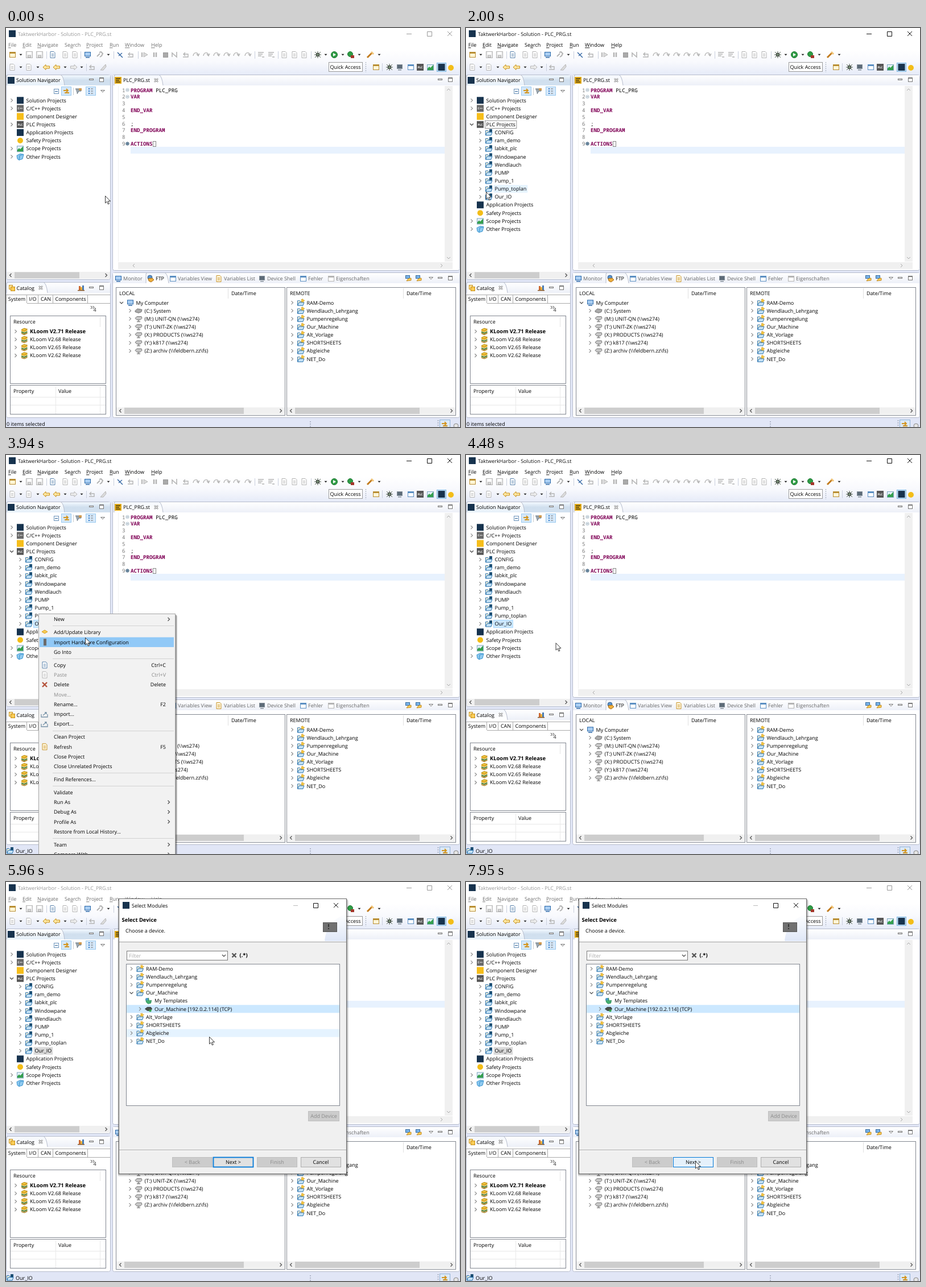
An HTML page for the animation above (8000 ms loop, 798 by 702 pixels).

```html
<!DOCTYPE html>
<html lang="en">
<head>
<meta charset="utf-8">
<title>Import hardware configuration</title>
<style>
html, body { margin: 0; width: 100%; height: 100%; overflow: hidden; background: #e1e6f6; }
svg { display: block; font: 9px "Open Sans", "Noto Sans", sans-serif; text-rendering: geometricPrecision; }
text { white-space: pre; }
.b { font-weight: 700; font-size: 9.4px; }
.code { font: 9.2px "Noto Sans Mono", "DejaVu Sans Mono", monospace; }
.kw { font-weight: 700; fill: #7f0055; }
.u { text-decoration: underline; }
.off { fill: #8a8a8a; }
.tiny { font-size: 5px; font-weight: 700; fill: #fff; text-anchor: middle; }
.mid { text-anchor: middle; }
.end { text-anchor: end; }
</style>
</head>
<body>
<svg id="stage" width="798" height="702" viewBox="0 0 798 702"></svg>
<script>
const PITCH = 14.15, LOOP = 8000;
const esc = s => s.replace(/&/g, '&amp;').replace(/</g, '&lt;');
const rect = (x, y, w, h, fill, more = '') => `<rect x="${x}" y="${y}" width="${w}" height="${h}" fill="${fill}" ${more}/>`;
const box = (x, y, w, h, fill, line) => rect(x + .5, y + .5, w - 1, h - 1, fill, `stroke="${line}"`);
const path = (d, line, fill = 'none', w = 1) => `<path d="${d}" stroke="${line}" fill="${fill}" stroke-width="${w}"/>`;
const disc = (x, y, r, fill, line = 'none') => `<circle cx="${x}" cy="${y}" r="${r}" fill="${fill}" stroke="${line}"/>`;
const text = (x, y, s, cls = '', fill = '') => `<text x="${x}" y="${y + 3.2}" class="${cls}" ${fill && `fill="${fill}"`}>${esc(s)}</text>`;
const at = (x, y, body) => `<g transform="translate(${x} ${y})">${body}</g>`;
const group = (id, body, more = '') => `<g id="${id}" ${more}>${body}</g>`;
const fade = (id, ...colors) => `<linearGradient id="${id}" x2="0" y2="1">${colors.map((c, i) =>
  `<stop offset="${i / (colors.length - 1)}" stop-color="${c}"/>`).join('')}</linearGradient>`;
const tag = (s, fill) => rect(-6, -6, 12, 12, fill) + `<text y="2" class="tiny">${s}</text>`;
const sheet = (line, fill = '#fff') => path('M-4-5.5H2L4-3.5V5.5H-4Z', line, fill) + path('M-2-1.5H2M-2 .5H2M-2 2.5H2', line, 'none', .8);
const pane = (line, fill = '#fff') => box(-5, -5, 11, 10, fill, line) + rect(-5, -5, 11, 3, line);
const left = (fill, line) => path('M-6 0L-1-4.5V-2H5.5V2H-1V4.5Z', line, fill);
const GRAY = '#b4b4b4';

const icons = {
  navy: rect(-6, -6, 12, 12, '#17334e'),
  gold: rect(-6, -6, 12, 12, '#f6bd1a'),
  sun: disc(0, 0, 5, '#f3bd18'),
  plc: tag('PLC', '#555'),
  cpp: tag('C++', '#686868'),
  folder: path('M-5.5 5V-3.5H-1.5L-.5-2H4V0', '#2b73ae', '#fdf6dc') + path('M-5.5 5L-3-.5H6L4 5Z', '#2b73ae', '#c4e2f6'),
  star: path('M3.5-7L4.5-4.7 7-4 4.800-2.500 4.500 0 3-1.700 .5-1.500 1.700-3.700 1-6 3-5.300Z', '#c88f17', '#f8c93b', .6),
  badge: rect(1, -6, 5, 5, '#1d4f73'),
  scope: box(-6, -5, 12, 11, '#e4f1fa', '#7fa6bd') + path('M-5 5V2L-2-1 0 1 5-4V5Z', 'none', '#35a04d'),
  cubes: path('M-6-2L0-5 6-4 4 4-2 6-5 4Z', '#3a93cf', '#8fcaf0') + path('M-2 6L-1-2 6-4', '#3a93cf'),
  monitor: box(-5, -5, 11, 8, '#a8cdf2', '#2a67a8') + rect(-3, 4, 7, 1.5, '#2a67a8'),
  drive: path('M-6-1L-3-4H5L6-1 3 2H-3Z', '#777', '#c8c8c8') + path('M0 2V5M-3 5H3', '#777', 'none', 1.3),
  disk: path('M-6 0L-2-3.5 6-2 5 2 0 4-6 2Z', '#777', '#aaa'),
  books: path('M-5-3L0-5.5 5.500-4 0-1Z', '#b98a1b', '#f3c73c') + path('M-5-2L0 0 5.500-2.500', '#e2ab27', 'none', 2) +
    path('M-5 1L0 3 5.500 .5', '#4f7d2c', 'none', 2) + path('M-5 3.500L0 5.500 5.500 3', '#a87a1c', 'none', 1.600),
  shelf: rect(-4, -3, 3, 7, '#cf6b32') + rect(-1, -1, 3, 5, '#e9b23a') + rect(2, -4, 3, 8, '#4a7db5') + rect(-6, 4, 12, 1.500, '#8a5a2a'),
  crate: box(-5, -5, 7, 8, '#ffe7a0', '#c88f17') + box(-2, -2, 8, 8, '#f8cb55', '#c88f17'),
  ftp: disc(-1, -2, 4, '#5a93cd', '#39628e') + path('M-4 0L3-1 6 2 1 6-3 4Z', '#a96a12', '#f0b03c'),
  pane: pane('#5b8fc2'), gpane: pane(GRAY), ypane: pane('#b98e33', '#fff6d6'),
  sheet: sheet('#c9962f', '#fff6dc'), gsheet: sheet(GRAY), bsheet: sheet('#5b83ad'),
  shell: box(-5, -5, 10, 8, '#5d6b78', '#85909a') + rect(-3, 4, 6, 1.5, '#85909a'),
  save: box(-6, -6, 12, 12, '#ededed', GRAY) + rect(-3, -5, 6, 4, '#fff') + box(-3, 1, 6, 4, '#ddd', GRAY),
  link: path('M-5 3L0-2M-1-4L2-5 5-2 3 2 0 4', GRAY, 'none', 2),
  pen: path('M-5-4L4 5M-3 2L3-3', '#3a6ba6', 'none', 1.5),
  gpen: path('M-5 5L4-5L5-1L0 5Z', GRAY, '#ddd'),
  opencil: path('M-6 5L2-3', '#c27a1d', 'none', 3) + path('M1-5L5-1', '#f0c477', 'none', 3),
  resume: rect(-6, -4, 2, 8, GRAY) + path('M-2-4L5 0-2 4Z', GRAY, '#ddd'),
  pause: path('M-2-4V4M2-4V4', GRAY, 'none', 2.5),
  stop: box(-4, -4, 9, 9, '#aaa', '#999'),
  zig: path('M-5 4V-3L3 4V-5', GRAY, 'none', 1.6),
  hop: path('M-5 2C-4-5 3-5 4 1M1-1L4 2 6-2', GRAY, 'none', 1.4),
  gleft: path('M-5 4H4V-1H-4M-1-4L-4-1-1 2', GRAY, 'none', 1.4),
  list: path('M-5-4H5M-5-1H3M-5 2H1M2 4H6', GRAY, 'none', 1.4),
  bug: path('M-5-5L5 5M5-5L-5 5M-6 0H6M0-6V6', '#4b5a4b') + disc(0, 0, 2.8, '#738a72', '#333'),
  run: disc(0, 0, 5.5, '#2e9c44', '#1d7533') + path('M-2-3L3 0-2 3Z', 'none', '#fff'),
  tools: disc(-1, -1, 4.5, '#2e9c44', '#1d7533') + rect(0, 1, 6, 5, '#a3372c'),
  back: left('#ffe9a3', '#c58d16'),
  fwd: `<g transform="scale(-1 1)">${left('#eee', GRAY)}</g>`,
  sync: path('M-5-1H3M0-4L3-1 0 2M5 3H-3', '#d39520', 'none', 1.8),
  tool: path('M-6-4H4V0H0L-3 5', '#64727e', '#9aa5ad') + rect(0, -5, 5, 4, '#d09a4f'),
  rows: path('M-4-4H-2M-4 0H-2M-4 4H-2', '#2d75c5', 'none', 2) + path('M0-4H4M0 0H4M0 4H4', '#777'),
  minus: box(-4, -4, 9, 9, '#fff', '#6b93ba') + path('M-2 .5H3', '#2d6297'),
  net: box(-5, -5, 8, 6, '#7ab4e8', '#32689e') + path('M-3 5L0 1 5 0V4Z', '#c38a20', '#ffd25a'),
  st: rect(-6, -6, 12, 12, '#e4ac19') + path('M-4-3H4M-4 0H2M-4 3H4', '#4a3a0c', 'none', 1.5),
  cross: path('M-3.5-3.5L3.5 3.5M3.5-3.5L-3.5 3.5', '#555', 'none', 2.4),
  redx: path('M-4-4L4 4M4-4L-4 4', '#b4533c', 'none', 2.4),
  tray: path('M-6 0V5H5V0M-3 2L3-3M0-3H3V0', '#7893a8', 'none', 1.3),
  lib: path('M-5-1L0-4 5-1 0 2Z', '#d79d1d', '#f8cd56'),
  bar: rect(-2, -6, 5, 12, '#6b6b6b'),
  leaf: path('M-5-3L0-5 1 0 5-1 4 4-1 5-4 2Z', '#2a8b5b', '#45b06e') + rect(-5, -5, 4, 4, '#4c98d0'),
  dev: path('M-6 0L-2-3H4L6 0 3 3H-2Z', '#333', '#4a4f4a') + disc(3, 3, 2.2, '#37a24a'),
  drop: path('M-2.5-1.2H2.5L0 1.6Z', 'none', '#222'),
  close: path('M-3-3L3 3M3-3L-3 3', '#777', 'none', 2.4) + path('M-3-3L3 3M3-3L-3 3', '#fff', 'none', 1),
  tri: path('M-3.5-1.5H3.5L0 2Z', '#777', '#fff'),
  min: box(-4, -2, 8, 3, '#fff', '#777'),
  max: box(-4, -4, 8, 8, '#fff', '#777') + rect(-4, -4, 8, 2, '#777'),
  shut: path('M-1.5-3L1.5 0-1.5 3', '#858585', 'none', 1.1),
  open: path('M-3-1.5L0 1.5 3-1.5', '#444', 'none', 1.2),
  lt: path('M1.5-3L-1.5 0 1.5 3', '#555', 'none', 1.3),
  gt: path('M-1.5-3L1.5 0-1.5 3', '#555', 'none', 1.3),
};
const ic = (name, x, y) => at(x, y, name.split('+').map(n => icons[n]).join(''));
// "x:name" pairs laid along one line
const strip = (y, spec) => spec.split(' ').map(s => { const [x, n] = s.split(':'); return ic(n, +x, y); }).join('');
const hbar = (x, y, w, t0, t1) => rect(x, y - 6, w, 12, '#f0f0f0') + rect(t0, y - 5.5, t1 - t0, 11, '#cdcdcd') +
  ic('lt', x + 7, y) + ic('gt', x + w - 7, y);
const frame = (x, y, w, h, bar, tabX, tabW, tab) =>
  rect(x + .5, y + .5, w - 1, h - 1, '#fff', 'rx="3" stroke="#b6bccc"') + rect(x + 1, y + 1, w - 2, 18, `url(#${bar})`) +
  path(`M${tabX} ${y + 19}V${y + 3}Q${tabX} ${y + .5} ${tabX + 3} ${y + .5}H${tabX + tabW - 7}Q${tabX + tabW - 2} ${y + 2} ${tabX + tabW} ${y + 19}`, '#b6bccc', `url(#${tab})`);

// rows: [label, icon, chevron, indent]
const tree = (x, y, rows, cls = '') => rows.map(([s, icon, chev, dent = 0], i) => {
  const cy = y + i * PITCH, cx = x + dent;
  return (chev ? ic(chev, cx, cy) : '') + ic(icon, cx + 15, cy) + text(cx + 25.5, cy, s, cls);
}).join('');

const plants = ['RAM-Demo', 'Wendlauch_Lehrgang', 'Pumpenregelung', 'Our_Machine', 'Alt_Vorlage', 'SHORTSHEETS', 'Abgleiche', 'NET_Do'];
const rigs = ['CONFIG', 'ram_demo', 'labkit_plc', 'Windowpane', 'Wendlauch', 'PUMP', 'Pump_1', 'Pump_toplan', 'Our_IO'];
const top4 = chev => [['Solution Projects', 'navy', 'shut'], ['C/C++ Projects', 'cpp', 'shut'],
  ['Component Designer', 'gold'], ['PLC Projects', 'plc', chev]];
const rest = [['Application Projects', 'navy'], ['Safety Projects', 'sun'], ['Scope Projects', 'scope', 'shut'], ['Other Projects', 'cubes', 'shut']];
const navShut = [...top4('shut'), ...rest];
const navOpen = [...top4('open'), ...rigs.map(s => [s, 'folder+badge', 'shut', 15]), ...rest];
const NAV_Y = 127.3, DLG_Y = 152.6;

function header() {
  const names = ['File', 'Edit', 'Navigate', 'Search', 'Project', 'Run', 'Window', 'Help'];
  const xs = [4, 29, 55, 103, 141, 182, 209, 255];
  const menu = names.map((s, i) => {
    const k = s === 'Search' ? 2 : 0;
    return `<text x="${xs[i]}" y="33.4">${s.slice(0, k)}<tspan class="u">${s[k]}</tspan>${s.slice(k + 1)}</text>`;
  }).join('');
  return rect(0, 0, 798, 38, '#fff') + rect(0, 38, 798, 44, 'url(#bar)') + ic('navy', 11, 10) +
    group('title', text(21, 10.5, 'TaktwerkHarbor - Solution - PLC_PRG.st') +
      `<path d="M704 10.5H713M740.5 6.5H748.5V14.5H740.5ZM776 6L784 14M784 6L776 14" fill="none" stroke="currentColor"/>`, 'fill="currentColor"') +
    group('menuBar', menu) +
    strip(47, '11:ypane 26:drop 41:save 59:save 82:bsheet 104:gsheet 121:gsheet 143:monitor 165:link 180:drop 201:pen 219:gleft 244:resume 262:pause 280:stop 297:zig 316:gleft 334:hop 352:hop 370:hop 388:hop 405:hop 425:hop 448:list 466:list 489:gsheet 507:gsheet 524:gsheet 548:bug 562:drop 577:run 592:drop 606:tools 621:drop 641:opencil 656:drop') +
    strip(69, '11:gsheet 26:drop 40:gsheet 56:drop 71:back 89:back 104:drop 119:fwd 133:drop 151:gleft 171:gpen 650:ypane 674:bug 692:shell 711:pane 728:plc 746:scope') +
    path('M71.5 41V54M131.5 41V54M189.5 41V54M232.5 41V54M437.5 41V54M478.5 41V54M536.5 41V54M141.5 63V76M661.5 62V76', '#c9cfdd') +
    `<path d="M632.5 60V78" stroke="#8a93a6" stroke-dasharray="1.5 2"/>` +
    box(757, 61, 17, 16, '#cce4f7', '#7ab7e4') + ic('navy', 765.5, 69) + ic('sun', 782, 70) +
    box(567, 60, 60, 17, '#fff', '#9a9a9a') + text(569.5, 68.5, 'Quick Access');
}

function navigator() {
  return frame(0, 82, 184, 361, 'blue', 1, 102, 'sel') + ic('navy', 9, 92) + text(18, 92, 'Solution Navigator') +
    strip(91, '150:min 168:max') + box(97, 103, 18, 16, '#d5e8fa', '#99c9ef') + box(140, 103, 18, 16, '#d5e8fa', '#99c9ef') +
    strip(111, '88:minus 106:sync 128:tool 149:rows 170:tri') +
    path('M118.5 105V118', '#ccc') + `<rect id="navHot" height="13.4" fill="#e5f3ff"/><rect id="navSel" height="13.4" fill="#cce8ff"/>` +
    group('navShut', tree(10, NAV_Y, navShut)) + group('navOpen', tree(10, NAV_Y, navOpen)) +
    hbar(1, 435, 182, 15, 129);
}

function editor() {
  const lines = ['PROGRAM', 'VAR', '', 'END_VAR', '', ';', 'END_PROGRAM', '', 'ACTIONS'];
  const body = lines.map((s, i) => {
    const y = 109.3 + i * 11.8;
    return text(209.5, y, `${i + 1}`, 'code end', '#787878') + text(219, y, s, s === ';' ? 'code' : 'code kw');
  }).join('');
  const fold = (y, plus) => disc(213.5, y, 2.7, plus ? '#8fa9bd' : '#fff', plus ? '#45657e' : '#a9bccb') +
    path(`M212 ${y}H215${plus ? `M213.5 ${y - 1.5}V${y + 1.5}` : ''}`, '#45657e', 'none', .8);
  return frame(187, 82, 611, 345, 'pale', 190, 86, 'white') + ic('st', 197, 92) + text(206, 92, 'PLC_PRG.st') + ic('close', 264, 92) +
    strip(91, '763:min 781:max') + rect(219, 209, 552, 12, '#e8f2fe') + path('M197.5 102V411', '#f0f0f0') +
    body + text(263.3, 109.3, 'PLC_PRG', 'code') + fold(109, 0) + fold(121, 0) + fold(203.5, 1) + box(258, 199, 6, 10, '#fff', '#888') +
    rect(771, 102, 14, 309, '#f0f0f0') + rect(197, 412, 588, 12, '#f0f0f0') +
    path('M775 110L778 107 781 110M775 403L778 406 781 403M226 415L223 418 226 421M764 415L767 418 764 421', '#aaa');
}

function catalog() {
  const tabs = [['System', 1, 37], ['I/O', 37, 57], ['CAN', 57, 83], ['Components', 83, 144]].map(([s, a, b]) =>
    path(`M${b - .5} 470V484`, '#aaa') + text((a + b) / 2, 477, s, 'mid')).join('');
  const kits = ['2.71', '2.68', '2.65', '2.62'].map((v, i) => {
    const y = 533.8 + i * PITCH;
    return ic('shut', 17, y) + ic('books', 32, y) + text(42, y, `KLoom V${v} Release`, i ? '' : 'b');
  }).join('');
  return frame(0, 447, 184, 239, 'pale', 1, 72, 'white') + ic('crate', 10, 457) + text(18.5, 457.5, 'Catalog') + ic('close', 61, 457) +
    strip(457, '132:shelf 150:min 168:max') + path('M0 469.5H183M37 484.5H183M.5 470V485', '#aaa') + tabs +
    path('M149 489L151.5 491.5 149 494M152.5 489L155 491.5 152.5 494', '#222') + text(153.5, 496, '4', '', '#222') +
    box(7, 506, 169, 120, '#fff', '#828790') + text(13, 517, 'Resource') + path('M165.5 508V526', '#e5e5e5') + kits +
    box(7, 628, 169, 52, '#fff', '#828790') + text(13, 639, 'Property') + text(92, 639, 'Value') +
    path('M87.5 630V679M165.5 630V679M8 649.5H175M8 663.5H175', '#e8e8e8');
}

function transfer() {
  const tabs = [['Monitor', 206, 'monitor'], ['FTP', 263, 'ftp'], ['Variables View', 302, 'pane'], ['Variables List', 383, 'sheet'],
    ['Device Shell', 459, 'shell'], ['Fehler', 531, 'pane'], ['Eigenschaften', 580, 'gpane']];
  const drives = ['(C:) System', '(M:) UNIT-QN (\\\\ws274)', '(T:) UNIT-ZK (\\\\ws274)', '(X:) PRODUCTS (\\\\ws274)',
    '(Y:) k817 (\\\\ws274)', '(Z:) archiv (\\\\feldbern.zz\\fs)'].map((s, i) => [s, i ? 'drive' : 'disk', 'shut', 15]);
  return frame(187, 430, 611, 256, 'pale', 246, 40, 'white') +
    tabs.map(([s, x, n]) => ic(n, x - 9, 441) + text(x, 441, s, '', s === 'FTP' ? '#000' : '#666')).join('') +
    strip(440, '707:net 725:net 747:tri 763:min 781:max') +
    box(193, 456, 298, 226, '#fff', '#828790') + box(493, 456, 298, 226, '#fff', '#828790') +
    path('M390.5 458V476M698.5 458V476', '#e0e0e0') +
    text(199, 467, 'LOCAL') + text(396, 467, 'Date/Time') + text(499, 467, 'REMOTE') + text(704, 467, 'Date/Time') +
    tree(203, 483.3, [['My Computer', 'monitor', 'open'], ...drives]) +
    tree(503, 483.3, plants.map(s => [s, 'folder+star', 'shut'])) +
    hbar(194, 673.5, 296, 208, 418) + hbar(494, 673.5, 296, 508, 727);
}

function status() {
  return rect(0, 687, 798, 15, '#e1e6f6') + group('idle', text(1, 696.5, '0 items selected')) +
    group('picked', ic('folder+badge', 7, 696) + text(17, 697, 'Our_IO')) +
    `<path d="M535 692V702M759.5 690V702" stroke="#8a93a6" stroke-width="1.5" stroke-dasharray="1.5 2.5"/>` +
    box(762, 689, 19, 16, '#dbe9f8', '#8fb1d3') + ic('sync', 771, 697) + disc(791, 700, 4, '#e5e5e5', '#888');
}

// label, y, icon, key or submenu mark, disabled
const items = [
  ['New', 289, '', '>'], ['Add/Update Library', 312, 'lib'], ['Import Hardware Configuration', 329.3, 'bar'], ['Go Into', 346.5],
  ['Copy', 369.5, 'bsheet', 'Ctrl+C'], ['Paste', 386.8, 'gsheet', 'Ctrl+V', 1], ['Delete', 404, 'redx', 'Delete'], ['Move...', 421.3, '', '', 1],
  ['Rename...', 438.5, '', 'F2'], ['Import...', 456, 'tray'], ['Export...', 473, 'tray'], ['Clean Project', 496], ['Refresh', 513.3, 'sheet', 'F5'],
  ['Close Project', 530.7], ['Close Unrelated Projects', 548], ['Find References...', 570.7], ['Validate', 593.5], ['Run As', 610.7, '', '>'],
  ['Debug As', 628, '', '>'], ['Profile As', 645.3, '', '>'], ['Restore from Local History...', 662.6], ['Team', 685.5, '', '>'], ['Compare With', 702.8, '', '>']];

function popup() {
  return rect(60, 282, 241, 430, '#000', 'opacity=".22" rx="2"') + rect(59, 281, 240.5, 430, '#000', 'opacity=".25"') +
    box(57, 279, 241, 430, '#f2f2f2', '#a5a5a5') + '<rect id="menuHot" x="59" width="236" height="17.3" fill="#91c9f7"/>' +
    path([300, 358, 485, 559, 582, 674].map(y => `M82 ${y + .5}H295`).join(''), '#d2d2d2') +
    items.map(([s, y, icon, key, off]) => {
      const c = off ? 'off' : '';
      return (icon ? ic(icon, 68, y) : '') + text(84, y, s, c) +
        (key === '>' ? ic('gt', 286, y) : key ? text(281, y, key, c + ' end') : '');
    }).join('');
}

function dialog() {
  const button = (s, x, y, w, off, id = '') => `<g id="${id}">${box(x, y, w, 18, off ? '#cccccc' : '#e1e1e1', off ? '#bfbfbf' : '#adadad')}</g>` +
    text(x + w / 2, y + 9, s, off ? 'off mid' : 'mid');
  const rows = plants.map(s => [s, 'folder', 'shut']);
  rows[3][2] = 'open';
  rows.splice(4, 0, ['My Templates', 'leaf', '', 15], ['Our_Machine [192.0.2.114] (TCP)', 'dev', 'shut', 15]);
  const stars = rows.map(([, n], i) => n === 'folder' ? ic('star', 235.5, DLG_Y + i * PITCH) : '').join('');
  return rect(196, 31, 406, 487, '#000', 'opacity=".1" rx="4"') + rect(197, 30, 404, 486, '#000', 'opacity=".15" rx="2"') +
    box(198, 29, 401, 485, '#f0f0f0', '#666') + rect(199, 30, 399, 75, '#fff') +
    path('M560 104C562 78 578 64 598 55V104Z', 'none', 'url(#blob)') + path('M199 105.5H598', '#a0a0a0') +
    ic('navy', 211, 41) + text(221, 41.5, 'Select Modules') + path('M505 41.5H513', '#bbb') +
    path('M540.5 37.5H548.5V45.5H540.5ZM576 37L584 45M584 37L576 45', '#111') +
    text(203.5, 67, 'Select Device', 'b') + text(210, 86, 'Choose a device.') +
    box(557, 71, 25, 17, '#707070', '#555') + path('M567 74V79M567 81V83', '#222', 'none', 1.5) +
    box(212, 121, 178, 17, '#fff', '#7a7a7a') + text(216, 129.5, 'Filter', '', '#aaa') + ic('open', 383, 129.5) +
    ic('cross', 401, 129) + text(410.5, 129, '(.*)', 'b') +
    box(211, 144, 376, 250, '#fff', '#828790') + rect(212, 216.3, 374, 14, '#cce8ff') +
    '<rect id="dlgHot" x="212" width="374" height="14" fill="#e5f3ff"/>' +
    tree(220.5, DLG_Y, rows) + group('stars', stars) +
    button('Add Device', 531, 403, 55, 1) + path('M199 471.5H598', '#a8a8a8') + path('M199 472.5H598', '#fff') +
    button('< Back', 292, 484, 71, 1) + button('Next >', 364, 484, 71, 0, 'next') + button('Finish', 441, 484, 71, 1) + button('Cancel', 518, 484, 71, 0);
}

const stage = document.getElementById('stage');
stage.innerHTML = `<defs>${fade('bar', '#ffffff', '#f8f9fd', '#e6ebf8')}${fade('blue', '#f3f9ff', '#d0dfee', '#d2e1f0')}${
  fade('sel', '#ffffff', '#e6f0f9')}${fade('pale', '#ffffff', '#edf0f8')}${fade('white', '#f4f7fc', '#ffffff')}${
  fade('blob', '#ffffff', '#dfe7f7')}</defs>` +
  rect(0, 0, 798, 702, '#e1e6f6') + header() + navigator() + editor() + catalog() + transfer() + status() +
  group('menu', popup()) + group('dialog', dialog()) +
  '<circle id="ring" r="8.7" fill="#ff4a3a" fill-opacity=".12" stroke="#e0473a" stroke-opacity=".7"/>' +
  group('cursor', path('M.5 .5V13L3.4 10.4 5.4 15 7.4 14.1 5.4 9.7H9.5Z', '#222', '#fff', .9));

const el = {};
stage.querySelectorAll('[id]').forEach(e => el[e.id] = e);
const show = (id, on) => { el[id].style.display = on ? '' : 'none'; };
const set = (id, o) => { for (const k in o) el[id].setAttribute(k, o[k]); };

// start, end, steps, x, y
const moves = [
  [70, 700, 9, 12, 170], [850, 850, 1, 12, 171], [1360, 2000, 9, 35, 288], [2070, 2150, 2, 37, 291], [2250, 2470, 4, 57, 296],
  [3450, 3940, 7, 139, 321], [4030, 4110, 2, 143, 327], [4340, 4720, 6, 192, 338], [4796, 5100, 5, 229, 343],
  [5180, 5960, 11, 357, 272], [6040, 6670, 9, 346, 220], [7300, 7950, 9, 403, 491]];
const clicks = [[1100, 1200], [2770, 2870], [4340, 4415], [7070, 7150]];

function pointer(t) {
  let x = 174, y = 295;
  for (const [a, b, n, tx, ty] of moves) {
    if (t < a) break;
    const k = n > 1 ? Math.min(n, Math.floor((t - a) / (b - a) * (n - 1) + 1e-6) + 1) : 1;
    const u = k / n, e = (u + u * u * (3 - 2 * u)) / 2;
    x += (tx - x) * e;
    y += (ty - y) * e;
  }
  return [x, y];
}

function labelBox(open, i) {
  const rows = open ? navOpen : navShut;
  const label = [...el[open ? 'navOpen' : 'navShut'].querySelectorAll('text:not(.tiny)')][i];
  return { x: 33.5 + (rows[i][3] || 0), y: NAV_Y - 6.7 + i * PITCH, width: label.getComputedTextLength() + 4 };
}

function draw(t) {
  const [x, y] = pointer(t);
  const open = t >= 1100, picked = t >= 2770, menu = t >= 3120 && t < 4340, dlg = t >= 4490;
  const active = open && !dlg;
  set('cursor', { transform: `translate(${x} ${y})` });
  set('title', { color: active ? '#111' : '#999' });
  set('menuBar', { fill: active ? '#000' : '#6d6d6d' });
  show('navShut', !open);
  show('navOpen', open);
  show('idle', !picked);
  show('picked', picked);
  show('menu', menu);
  show('dialog', dlg);
  show('stars', t >= 5020);
  set('menu', { opacity: t < 3200 ? .45 : t < 3280 ? .86 : 1 });

  // navigator selection and hover
  show('navSel', open);
  if (open) set('navSel', {
    ...labelBox(true, picked ? 12 : 3),
    fill: !picked ? '#fff' : dlg ? '#d9d9d9' : '#cce8ff',
    stroke: !picked ? '#777' : dlg ? 'none' : '#99d1ff', 'stroke-width': .8 });
  const i = Math.floor((y - NAV_Y) / PITCH + .5);
  let hot = !picked && x < 183 && i >= 0 && i < (open ? navOpen : navShut).length;
  if (hot) {
    const b = labelBox(open, i);
    hot = x > 5 && x < b.x + b.width;
    set('navHot', b);
  }
  show('navHot', hot);

  const item = items.find(m => Math.abs(m[1] - y) <= 8.65);
  show('menuHot', menu && x > 58 && item);
  if (item) set('menuHot', { y: item[1] - 8.65 });

  const r = Math.floor((y - DLG_Y) / PITCH + .5);
  show('dlgHot', dlg && x > 211 && x < 586 && r >= 0 && r < 10 && r !== 5);
  set('dlgHot', { y: DLG_Y - 7.05 + r * PITCH });

  const over = x > 364 && x < 435 && y > 484 && y < 502;
  const face = el.next.firstChild;
  face.setAttribute('fill', over ? '#e5f1fb' : '#e1e1e1');
  face.setAttribute('stroke', '#0078d7');
  face.setAttribute('stroke-width', over ? 1 : 1.8);

  show('ring', clicks.some(([a, b]) => t >= a && t < b));
  set('ring', { cx: x + .5, cy: y + .5 });
}

const start = performance.now();
function tick() {
  draw((performance.now() - start) % LOOP);
  requestAnimationFrame(tick);
}
tick();
</script>
</body>
</html>
```
